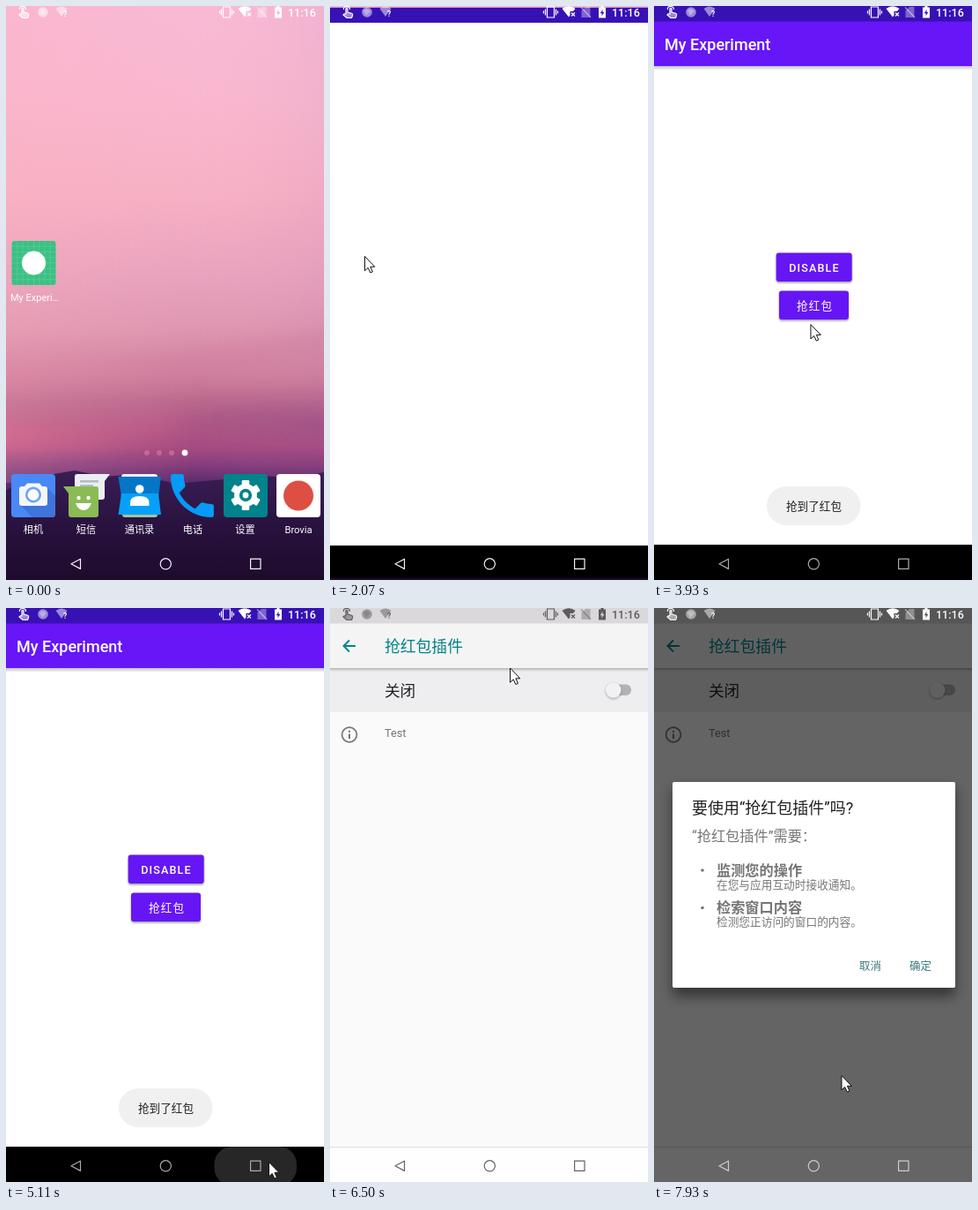
An HTML page that plays this animation: 361x650 px, repeating every 8000 ms.

```html
<!DOCTYPE html>
<html lang="zh-CN">
<head>
<meta charset="utf-8">
<title>Accessibility plugin demo</title>
<style>
  html, body { margin: 0; width: 100%; height: 100%; overflow: hidden; background: #000; }
  svg { display: block; width: 361px; height: 650px; }
  text { font-family: Roboto, "Noto Sans CJK SC", "Noto Sans CJK", sans-serif; }
</style>
</head>
<body>
<svg id="stage" viewBox="0 0 361 650" xmlns="http://www.w3.org/2000/svg">
  <defs>
    <linearGradient id="sky" x1="0" y1="0" x2="0" y2="1">
      <stop offset="0" stop-color="#f9b9d5"/>
      <stop offset=".16" stop-color="#f9b8d0"/>
      <stop offset=".33" stop-color="#f7b1c5"/>
      <stop offset=".47" stop-color="#e9a3be"/>
      <stop offset=".56" stop-color="#df98b2"/>
      <stop offset=".64" stop-color="#d282a0"/>
      <stop offset=".69" stop-color="#bb698e"/>
      <stop offset=".73" stop-color="#b25a86"/>
      <stop offset=".77" stop-color="#a64b82"/>
      <stop offset=".8" stop-color="#853c7b"/>
      <stop offset=".83" stop-color="#5b2c6d"/>
      <stop offset="1" stop-color="#2a1546"/>
    </linearGradient>
    <linearGradient id="warm">
      <stop offset="0" stop-color="#ffb0bc" stop-opacity=".24"/>
      <stop offset=".6" stop-color="#ffb0bc" stop-opacity="0"/>
      <stop offset="1" stop-color="#a06cae" stop-opacity=".08"/>
    </linearGradient>
    <linearGradient id="hill" x1="0" y1="0" x2="0" y2="1">
      <stop offset="0" stop-color="#3a1e56"/>
      <stop offset=".5" stop-color="#29123f"/>
      <stop offset="1" stop-color="#1d0b2c"/>
    </linearGradient>
    <linearGradient id="fall" x1="0" y1="0" x2="0" y2="1">
      <stop offset="0" stop-opacity=".24"/>
      <stop offset="1" stop-opacity="0"/>
    </linearGradient>
    <filter id="soft" x="-20%" y="-20%" width="140%" height="150%"><feGaussianBlur stdDeviation="7"/></filter>
    <filter id="haze" x="-20%" y="-100%" width="140%" height="300%"><feGaussianBlur stdDeviation="11"/></filter>
    <filter id="near" x="-20%" y="-20%" width="140%" height="160%"><feGaussianBlur stdDeviation="1.3"/></filter>
    <clipPath id="appClip"><rect id="appBox"/></clipPath>
    <clipPath id="setClip"><rect id="setBox"/></clipPath>
  </defs>

  <rect width="361" height="650" fill="url(#sky)"/>
  <g filter="url(#haze)">
    <path d="M-20 395Q120 420 380 360V385Q180 440 -20 425Z" fill="#c76d92" opacity=".25"/>
    <path d="M-20 468Q90 496 230 466Q120 500 -20 500Z" fill="#d85a82" opacity=".7"/>
    <path d="M180 472Q280 450 380 458V490Q260 482 180 472Z" fill="#8a4380" opacity=".35"/>
  </g>
  <rect width="361" height="540" fill="url(#warm)"/>
  <path d="M0 548L30 534L78 526L112 533L150 530L192 541L236 537L285 532L330 534L361 528V650H0Z" fill="url(#hill)"/>

  <g id="launcher"></g>
  <rect id="dim" width="361" height="650"/>

  <rect id="setShade" x="10" y="76" width="343" height="600" filter="url(#near)"/>
  <g id="settings" clip-path="url(#setClip)">
    <g id="setView"></g>
    <g id="setHead"></g>
  </g>
  <text id="clear" x="302" y="51" font-size="12.5" fill="#fff">全部清除</text>

  <rect id="appShade" x="11.5" y="501" width="340" height="8" fill="url(#fall)" transform="rotate(180 181.5 505)"/>
  <g id="app" clip-path="url(#appClip)">
    <g id="appView"></g>
    <g id="appHead"></g>
  </g>

  <rect id="scrim" width="361" height="650"/>
  <g id="dialog"></g>
  <rect id="ripple" x="236.5" y="610" width="93.5" height="44" rx="20" fill="#272727"/>
  <g id="nav" fill="none" stroke="currentColor" stroke-width="1.2" stroke-linejoin="round">
    <path d="M84.5 626.2V637.4L74 631.8Z"/>
    <circle cx="181.3" cy="631.8" r="6.1"/>
    <rect x="277.6" y="626.2" width="11.4" height="11.2"/>
  </g>
  <g id="status"></g>
  <g id="toast">
    <rect x="128" y="544" width="106.5" height="44" rx="22" fill="#eee" opacity=".88"/>
    <text x="150" y="571" font-size="12.6" fill="#222">抢到了红包</text>
  </g>
  <path id="cursor" d="M.5 .5V16.8L4.2 13.4L6.8 19L9.4 17.9L6.9 12.3H11.8Z" fill="#fff" stroke="#111" stroke-width="1"/>
</svg>
<script>
const LOOP = 8000;
const $ = id => document.getElementById(id);
const put = (id, html) => { $(id).innerHTML = html; };
const attr = (id, o) => { for (const k in o) $(id).setAttribute(k, o[k]); };
const fade = (id, v) => attr(id, { opacity: v.toFixed(3), visibility: v > 0 ? 'visible' : 'hidden' });

const lerp = (a, b, p) => a + (b - a) * p;
const mix = (a, b, p) => a.map((v, i) => lerp(v, b[i], p));
const ramp = (t, a, b) => Math.min(1, Math.max(0, (t - a) / (b - a)));
const out = (u, n = 2.5) => 1 - (1 - u) ** n;
const smooth = u => u * u * (3 - 2 * u);
const grey = v => `rgb(${[v, v, v].map(Math.round)})`;

const APP = 'My Experiment';
const TEAL = '#008489';

// Text centred vertically on cy
const label = (x, cy, size, str, fill, more = '') =>
  `<text x="${x}" y="${cy + size * .37}" font-size="${size}" fill="${fill}" ${more}>${str}</text>`;
const box = (x, y, w, h, fill, r = 0, more = '') =>
  `<rect x="${x}" y="${y}" width="${w}" height="${h}" rx="${r}" fill="${fill}" ${more}/>`;
const dot = (x, y, r, fill, more = '') => `<circle cx="${x}" cy="${y}" r="${r}" fill="${fill}" ${more}/>`;
const shape = (d, fill, more = '') => `<path d="${d}" fill="${fill}" ${more}/>`;

function gear(cx, cy, r, hole) {
  let s = dot(cx, cy, r * .76, '#fff');
  for (let i = 0; i < 6; i++)
    s += box(cx - r * .25, cy - r, r * .5, r * .6, '#fff', r * .08, `transform="rotate(${i * 60} ${cx} ${cy})"`);
  return s + dot(cx, cy, r * .42, hole) + dot(cx, cy, r * .2, '#fff');
}

function appIcon(x, y, s) {
  let lines = '';
  for (let i = 1; i < 8; i++) {
    const d = s * i / 8;
    lines += `M${x + d} ${y}v${s}M${x} ${y + d}h${s}`;
  }
  return box(x, y, s, s, '#3ac183', s * .07) +
    shape(lines, 'none', 'stroke="#fff" stroke-opacity=".2" stroke-width=".6"') +
    dot(x + s / 2, y + s / 2, s * .27, '#fff');
}

function buildLauncher() {
  const name = (x, s) => label(x, 593, 11.2, s, '#fff', 'text-anchor="middle"');
  const pages = [160, 174, 188].map(x => dot(x, 506, 3, '#ff8fb4', 'opacity=".4"')).join('');
  put('launcher',
    appIcon(6.5, 266, 50) + label(5, 329.5, 11, 'My Experi…', '#fff') +
    pages + dot(203, 506, 3.4, '#fff') +
    // camera
    box(6, 530, 50, 49, '#4a88f6', 4) + shape('M46 545L56 555V575Q56 579 52 579H30L17 566Z', '#3f74dc') +
    shape('M24 540.5H38L41 544H44Q47 544 47 547V563Q47 566 44 566H18Q15 566 15 563V547Q15 544 18 544H21Z', '#f4f6fb') +
    dot(31, 553.5, 9, '#6ba0f9') + dot(31, 553.5, 6.4, '#fff') +
    // messages
    shape('M81 530H118L112 538V556Q112 559 109 559H81Q78 559 78 556V533Q78 530 81 530Z', '#eceff1') +
    box(84, 537, 21, 2.6, '#b3bcc2') + box(84, 542, 15, 2.6, '#b3bcc2') +
    shape('M65 544H102Q105 544 105 547V576Q105 579 102 579H74Q71 579 71 576V552Z', '#8bbb54') +
    dot(82.5, 557, 2.2, '#fff') + dot(93.5, 557, 2.2, '#fff') +
    shape('M79 563H97Q94 571 88 571T79 563Z', '#fff') +
    // contacts
    box(131, 530, 41, 12, '#eceff1', 3) + box(132, 570, 40, 9, '#a8c3a0', 3) +
    shape('M127.5 533H176L173 556H131Z', '#0575c6') + shape('M131 552H173L176 576H127.5Z', '#06a0f8') +
    dot(151.7, 547, 4.8, '#fff') + shape('M141 566V562Q141 555 151.7 555T162.5 562V566Z', '#fff') +
    // phone
    shape('M6.6 10.8C8 13.6 10.4 16 13.2 17.4L15.4 15.2Q15.9 14.7 16.4 14.9Q18 15.5 20 15.5Q21 15.5 21 16.5V20Q21 21 20 21C10.6 21 3 13.4 3 4Q3 3 4 3H7.5Q8.5 3 8.5 4Q8.5 6 9.1 7.6Q9.2 8.2 8.8 8.6Z',
      '#079af7', 'transform="translate(178.8 521.8) scale(2.72)"') +
    // settings and browser
    box(247, 530, 50, 49, '#00838a', 4) + gear(272, 554, 17, '#00838a') +
    box(307, 530, 50, 49, '#fff', 4) + dot(332, 554.5, 17, '#dd4f43') +
    name(31, '相机') + name(91, '短信') + name(151.5, '通讯录') +
    name(212, '电话') + name(271.5, '设置') + name(332, 'Brovia'));
}

function buildApp() {
  const button = (x, y, w) =>
    box(x, y + 1.5, w, 32.5, '#000', 3, 'opacity=".4" filter="url(#near)"') + box(x, y, w, 32.5, '#6616f5', 3);
  put('appView',
    box(-20, 0, 401, 680, '#fff') + box(-20, 0, 401, 18, '#3811b4') +
    '<g id="content">' +
    box(-20, 68, 401, 5, 'url(#fall)') +
    box(-20, 17.5, 401, 50.5, '#6616f7') + label(12, 43.5, 18, APP, '#fff', 'font-weight="500"') +
    button(138.7, 279.5, 86) + label(153.3, 296, 12.6, 'DISABLE', '#fff', 'font-weight="500" letter-spacing="1.1"') +
    button(142, 322.5, 79) + label(162, 339, 12.6, '抢红包', '#fff', 'font-weight="500" letter-spacing="1.1"') +
    '</g>' + box(-20, 610, 401, 70, '#000', 0, 'id="bar"'));
  put('appHead',
    box(11, 509, 341, 50, '#5b13d8') + appIcon(26, 522, 24.5) +
    label(62, 535, 14.3, APP, '#d3c6ee') + box(11, 559, 341, 100, '#fbfbfc'));
}

function buildSettings() {
  put('setView',
    box(-20, 0, 401, 720, '#fbfafb') + box(-20, 0, 401, 18, '#dad8da') +
    box(-20, 68, 401, 50, '#eeedef') + box(-20, 68, 401, 4, 'url(#fall)') +
    box(-20, 17.5, 401, 50.5, '#f5f4f5') +
    shape('M29 43H16M22 36.5L15.5 43L22 49.5', 'none', `stroke="${TEAL}" stroke-width="1.9"`) +
    label(62, 43, 17.8, '抢红包插件', TEAL) + label(62, 93, 17.6, '关闭', '#212121') +
    box(317, 86.5, 25, 12.5, '#b4b1b4', 6.2) +
    dot(321.7, 94, 9.2, '#000', 'opacity=".25" filter="url(#near)"') + dot(321.7, 93, 8.8, '#f2f0f2') +
    dot(22, 143.5, 8.4, 'none', 'stroke="#757575" stroke-width="1.7"') +
    box(21, 142.5, 2, 5.5, '#757575') + box(21, 138.8, 2, 2, '#757575') +
    label(62, 141.7, 12.7, 'Test', '#757575') +
    '<g id="foot">' + box(0, 610, 361, 40, '#fefefe') + box(0, 610, 361, 1, '#dcdcdc') + '</g>');
  put('setHead',
    box(11, 75, 341, 50, '#f7f5f8') + box(25.5, 87, 25.5, 26, '#00838a', 2) +
    gear(38.2, 100, 9, '#00838a') + label(62, 100, 13.8, '设置', '#333'));
}

function buildDialog() {
  const item = (cy, head, note) =>
    dot(55, cy, 1.8, '#777') + label(71, cy, 16.2, head, '#757575', 'font-weight="700"') +
    label(71, cy + 16, 12.7, note, '#777');
  put('dialog',
    box(21, 204, 321, 236, '#000', 3, 'opacity=".45" filter="url(#soft)"') + box(21, 197, 321, 233, '#fff', 2) +
    label(43, 226, 18, '要使用“抢红包插件”吗?', '#212121') +
    label(43, 258, 16.2, '“抢红包插件”需要：', '#777') +
    item(297, '监测您的操作', '在您与应用互动时接收通知。') +
    item(339.5, '检索窗口内容', '检测您正访问的窗口的内容。') +
    label(233, 405, 12.5, '取消', '#3a7a7c') + label(290, 405, 12.5, '确定', '#3a7a7c'));
}

function buildStatus() {
  const c = 'currentColor', line = `stroke="${c}" stroke-width="1.2"`;
  put('status',
    shape('M18 9V3Q19 1.5 20 3V7L25 8.5Q26 9 25.5 11L24.5 13.5H19L15 10Q15.5 8.5 18 9Z', c, 'fill-opacity=".5" ' + line) +
    shape('M15.5 4Q15 .5 19 .5Q22.5 .5 22.5 4', 'none', line) +
    dot(42, 7, 5.8, c, 'opacity=".5"') + shape('M38 5Q42 1 46 6L41 11Z', c, 'opacity=".3"') +
    shape('M56.5 3Q63 -2 69.5 3L63 12Z', c, 'opacity=".5"') + label(65, 9, 8.5, '?', c, 'font-weight="700"') +
    shape('M246.5 1H254.5V13H246.5ZM244.5 3.5V10.5M256.5 3.5V10.5M242.5 5.5V8.5M258.5 5.5V8.5', 'none', line) +
    shape('M263.5 3Q271 -2.5 278.5 3L276 6H272.5V10.5L271 12.5Z', c) +
    shape('M274 7.5L278 11.5M278 7.5L274 11.5', 'none', line) +
    shape('M290 1H295.5V13H285.5V5.5Z', c, 'opacity=".35"') +
    shape('M285 1.5L296 13', 'none', line + ' opacity=".5"') +
    shape('M307.5 0H310.5V1.5H313V13.5H305V1.5H307.5ZM309.5 4L306.8 8.2H308.6V11.2L311.3 7H309.5Z', c, 'fill-rule="evenodd"') +
    label(320, 7.5, 12.5, '11:16', c, 'font-weight="500"'));
}

// time, x, y, easing into this point
const TRACK = [
  [390, 315, 640], [1060, 39, 283, out], [2480, 39, 283], [2900, 126, 314, u => u ** 1.5],
  [3040, 176, 326, u => out(u, 1.6)], [3820, 176, 326], [4280, 186, 559, smooth], [4490, 186, 559],
  [4500, 281, 632], [4690, 298, 627, smooth], [5200, 298, 627], [5530, 252.5, 455.5, u => u ** 1.4],
  [5740, 196, 300, out], [6230, 196, 300], [6500, 204, 67.5, smooth],
  [6640, 316, 64, smooth], [7050, 330, 88, out], [7540, 330, 88], [7930, 212.5, 529, smooth], [LOOP, 212.5, 529]
];

function cursorAt(t) {
  const i = Math.max(1, TRACK.findIndex(k => k[0] >= t));
  const a = TRACK[i - 1], b = TRACK[i];
  const u = ramp(t, a[0], b[0]), p = b[3] ? b[3](u) : u;
  return [lerp(a[1], b[1], p), lerp(a[2], b[2], p)];
}

const setRect = (id, [x, y, width, height]) => attr(id, { x, y, width, height });
const FULL = [-4, 0, 369, 650];

function draw(t) {
  const launch = out(ramp(t, 1680, 2130));
  const recents = smooth(ramp(t, 5130, 5440));
  const open = out(ramp(t, 5870, 6230));
  const ask = smooth(ramp(t, 7520, 7740));

  fade('launcher', t < 2200 ? 1 : 0);
  fade('dim', .6 * recents);
  fade('clear', recents * (1 - open));

  // App window: reveal from its icon, later sinks into a card
  const shown = t > 1680 && open < 1;
  const drop = open * 150;
  fade('app', shown ? ramp(t, 1680, 1760) : 0);
  setRect('appBox', recents ? mix(FULL, [11.6, 509 + drop, 339.8, 150], recents) : mix([6, 266, 50, 50], FULL, launch));
  const sink = (1 - launch) * 150 + recents * (493 + drop);
  attr('appView', { transform: `translate(${11 * recents} ${sink}) scale(${1 - .055 * recents})` });
  attr('appHead', { transform: `translate(0 ${drop - 509 * (1 - recents)})` });
  fade('appHead', ramp(recents, .3, 1));
  fade('appShade', recents === 1 ? 1 - ramp(open, 0, .3) : 0);
  fade('content', ramp(t, 2270, 2420));
  fade('bar', 1 - recents);

  // Settings: card that grows to the whole stage
  fade('setShade', .5 * recents * (1 - open));
  fade('settings', ramp(recents, 0, .7));
  setRect('setBox', mix([11.6, 75, 339.8, 575], FULL, open));
  attr('setView', { transform: `translate(${14 * (1 - open)} ${58.4 * (1 - open)}) scale(${lerp(.92, 1, open)})` });
  attr('setHead', { transform: `translate(${-11 * open} ${-57 * open})` });
  fade('setHead', 1 - ramp(open, .2, .9));
  fade('foot', ramp(open, .7, 1));

  fade('scrim', .6 * ask);
  fade('dialog', ask);
  const s = lerp(.93, 1, ask);
  attr('dialog', { transform: `translate(${181.5 * (1 - s)} ${313.5 * (1 - s)}) scale(${s})` });

  fade('ripple', ramp(t, 4970, 5090) * (1 - ramp(t, 5130, 5260)));
  fade('toast', ramp(t, 3580, 3780) * (1 - ramp(t, 5550, 5740)));

  let tone = lerp(245, 172, ramp(t, 2270, 2900));
  tone = lerp(tone, 236, recents);
  tone = lerp(lerp(tone, 98, open), 205, ask);
  $('nav').style.color = grey(tone);
  $('status').style.color = grey(lerp(lerp(255, 92, open), 250, ask));

  const [x, y] = cursorAt(t);
  attr('cursor', { transform: `translate(${x} ${y})` });
  fade('cursor', t < 390 || (t >= 4350 && t < 4500) ? 0 : 1);
}

buildLauncher();
buildApp();
buildSettings();
buildDialog();
buildStatus();

function tick() {
  draw(performance.now() % LOOP);
  requestAnimationFrame(tick);
}
tick();
</script>
</body>
</html>
```
